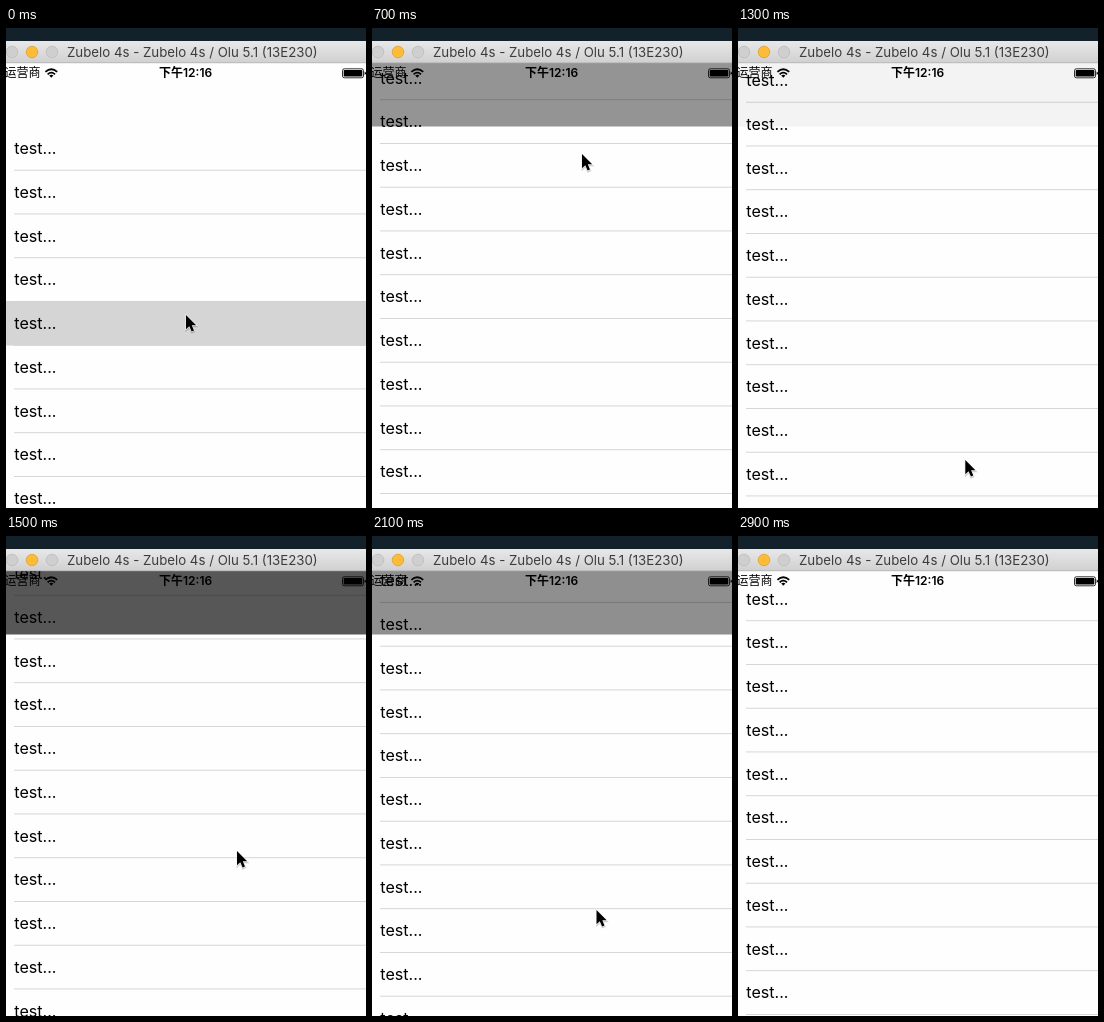
An HTML page for the animation above (3 s loop, 360 px wide and 480 px high).

```html
<!DOCTYPE html>
<html lang="zh">
<head>
<meta charset="utf-8">
<title>Scrolling list</title>
<style>
  html, body { margin: 0; width: 100%; height: 100%; overflow: hidden; background: #fefefe; }
  svg { display: block; width: 360px; height: 480px; }
  text { font-family: Inter, "Noto Sans CJK SC", "Noto Sans CJK", sans-serif; fill: #000; white-space: pre; }
</style>
</head>
<body>
<svg viewBox="0 0 360 480">
  <defs>
    <linearGradient id="bar" x1="0" y1="0" x2="0" y2="1">
      <stop offset="0" stop-color="#e9e8e9"/>
      <stop offset="1" stop-color="#d1d0d1"/>
    </linearGradient>
    <clipPath id="screen"><rect y="35" width="360" height="445"/></clipPath>
  </defs>
  <rect width="360" height="480" fill="#fefefe"/>
  <g clip-path="url(#screen)"><g id="list"></g></g>
  <rect id="nav" y="35" width="360" height="63.5" fill="#000"/>

  <g id="status">
    <text x="-1.5" y="49.3" font-size="12">运营商</text>
    <g fill="none" stroke="#000" stroke-width="1.8">
      <path d="M39.4 43.9Q45.3 38.6 51.2 43.9"/>
      <path d="M41.6 46.3Q45.3 43 49 46.3"/>
    </g>
    <path d="M43.2 47.6Q45.3 45.9 47.4 47.6L45.3 49.8z"/>
    <text x="153" y="49.3" font-size="12" font-weight="600">下午12:16</text>
    <rect x="336.5" y="40.8" width="21" height="9" rx="1.8" fill="none" stroke="#000" stroke-width=".8"/>
    <rect x="337.7" y="42" width="18.6" height="6.6" rx=".8"/>
    <path d="M358.6 43.6q1.4.4 1.4 1.7t-1.4 1.7z"/>
  </g>

  <rect width="360" height="13" fill="#12212a"/>
  <rect y="13" width="360" height="22" fill="url(#bar)"/>
  <rect y="34.4" width="360" height=".8" fill="#b4b3b4"/>
  <g stroke-width=".8">
    <circle cx="6" cy="24" r="5.8" fill="#d0cfd0" stroke="#bdbcbd"/>
    <circle cx="26" cy="24" r="5.8" fill="#fdbc38" stroke="#dfa030"/>
    <circle cx="46" cy="24" r="5.8" fill="#d0cfd0" stroke="#bdbcbd"/>
  </g>
  <text x="61" y="29" font-size="13.25" style="fill:#3c3c3c">Zubelo 4s - Zubelo 4s / Olu 5.1 (13E230)</text>

  <g id="cursor">
    <path d="M0 0V14.2L3.3 11.2L5.6 16.4L8 15.4L5.8 10.3H10.2z" transform="translate(.3 1.2)"
      fill="#000" opacity=".18" stroke="#000" stroke-width="1.6"/>
    <path d="M0 0V14.2L3.3 11.2L5.6 16.4L8 15.4L5.8 10.3H10.2z"
      fill="#000" stroke="#fff" stroke-width="1.1" paint-order="stroke"/>
  </g>
</svg>
<script>
const LOOP = 3000, STEP = 100;
const TOP = 98.5, ROW = 43.75, ROWS = 18, PRESSED = 4;
const FADE_FROM = 57.5, FADE_SPAN = 240;

// [time, scroll offset]
const scroll = [[0, 0], [100, 8], [400, 92], [700, 158], [800, 156], [1000, 111.25],
  [1200, 60], [1300, 68], [1500, 214.25], [1700, 272], [1900, 267.5], [2300, 59.5],
  [2400, 57.5], [3000, 57.5]];
// [time, pointer position]
const pointX = [[0, 180], [700, 210], [1000, 217], [1500, 231], [1900, 227], [2300, 223], [3000, 223]];
const pointY = [[0, 287], [100, 279], [400, 194], [700, 126], [800, 130], [1000, 176],
  [1200, 268], [1300, 432], [1500, 315], [1700, 266], [1900, 284], [2300, 471], [2500, 500], [3000, 500]];

const $ = id => document.getElementById(id);

function add(parent, tag, attrs, text) {
  const el = document.createElementNS("http://www.w3.org/2000/svg", tag);
  for (const k in attrs) el.setAttribute(k, attrs[k]);
  if (text) el.textContent = text;
  parent.appendChild(el);
  return el;
}

// Monotone cubic curve through the keys
function curve(keys, t) {
  const rate = i => (keys[i + 1][1] - keys[i][1]) / (keys[i + 1][0] - keys[i][0]);
  const slope = i => {
    if (i === 0) return rate(0);
    if (i === keys.length - 1) return rate(i - 1);
    const a = rate(i - 1), b = rate(i);
    return a * b <= 0 ? 0 : 2 * a * b / (a + b);
  };
  let i = 0;
  while (i < keys.length - 2 && t >= keys[i + 1][0]) i++;
  const [t0, v0] = keys[i], [t1, v1] = keys[i + 1];
  const h = t1 - t0, u = (t - t0) / h, w = 1 - u;
  return v0 * (1 + 2 * u) * w * w + v1 * u * u * (3 - 2 * u)
    + h * u * w * (slope(i) * w - slope(i + 1) * u);
}

const list = $("list");
const press = add(list, "rect", { y: TOP + PRESSED * ROW - .5, width: 360, height: ROW + .8, fill: "#d5d5d5" });
for (let i = 0; i < ROWS; i++) {
  const y = TOP + i * ROW;
  add(list, "text", { x: 8.3, y: y + 27.6, "font-size": 16.1 }, "test...");
  add(list, "rect", { x: 8, y: y + ROW - .5, width: 352, height: .9, fill: "#d2d2d5" });
}

function draw(ms) {
  const t = Math.floor(ms % LOOP / STEP) * STEP;
  const offset = curve(scroll, t);
  const alpha = Math.max(0, Math.min(1, (offset - FADE_FROM) / FADE_SPAN));
  list.setAttribute("transform", `translate(0 ${-offset})`);
  press.setAttribute("opacity", t < 100 ? 1 : 0);
  $("nav").setAttribute("opacity", alpha);
  $("cursor").setAttribute("transform", `translate(${curve(pointX, t)} ${curve(pointY, t)})`);
}

const start = performance.now();
function tick() {
  draw(performance.now() - start);
  requestAnimationFrame(tick);
}
tick();
</script>
</body>
</html>
```
